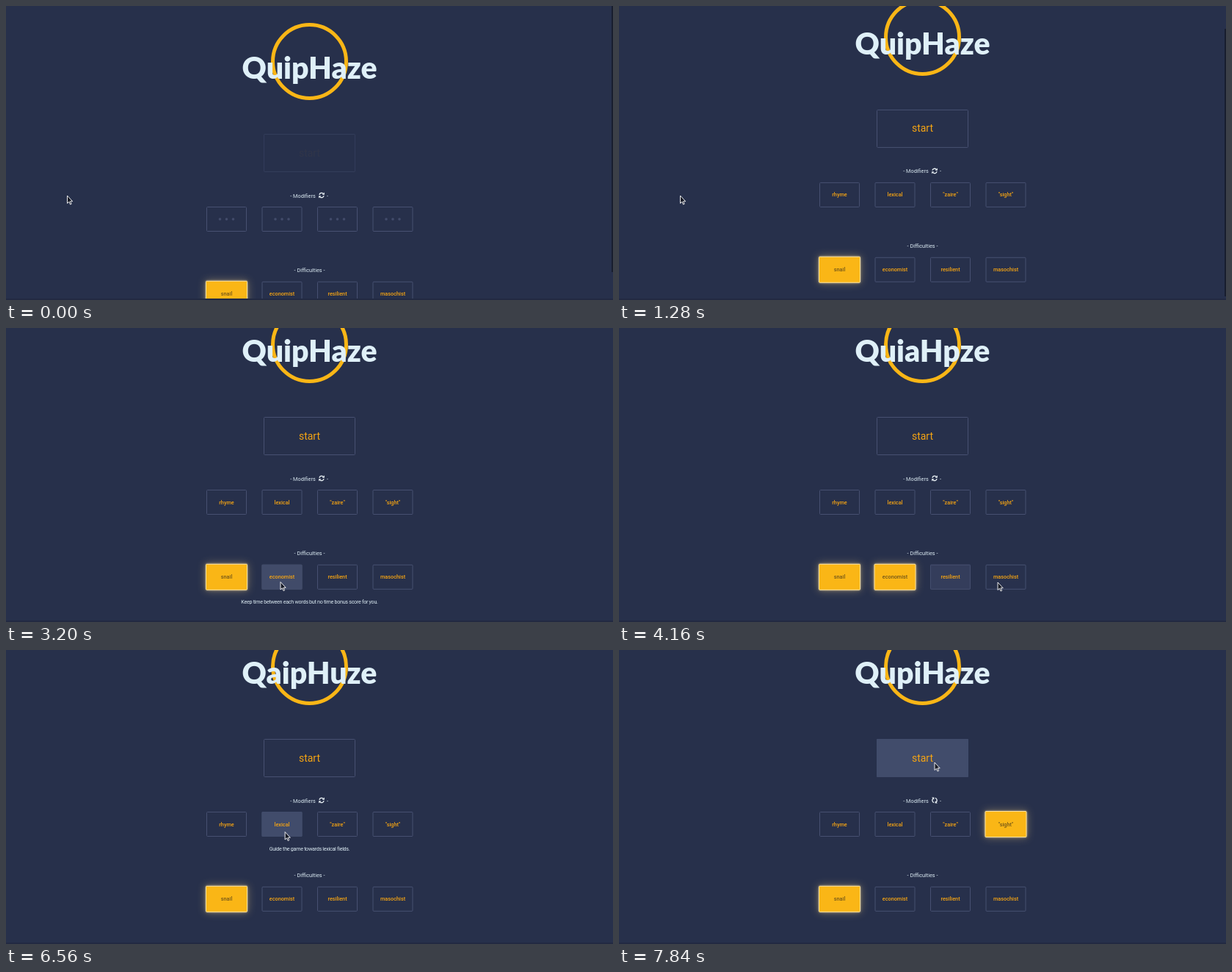
Write an HTML page that moves like this. It is 827 by 400 pixels and loops after 8 s.

```html
<!DOCTYPE html>
<html lang="en">
<head>
<meta charset="utf-8">
<title>QuipHaze</title>
<style>
html, body { margin: 0; width: 827px; height: 400px; overflow: hidden; background: #27304b; }
svg { display: block; }
text { font: 7.3px Roboto, sans-serif; text-anchor: middle; fill: #dcebf3; }
.name { font: 900 41px Lato, sans-serif; fill: #dff0f8; }
.label { font-weight: 500; fill: #f5a413; }
.big { font-size: 14px; font-weight: 400; }
.tip { font-size: 7.2px; letter-spacing: -.3px; }
.frame { fill: none; stroke: #475071; }
.hover { fill: #414c6b; }
.lit { fill: #fab616; stroke: #fde3a0; filter: drop-shadow(0 0 1.5px #fde3a099) drop-shadow(0 0 6px #e8c88066); }
.dots { fill: #434c6b; }
</style>
</head>
<body>
<svg width="827" height="400" viewBox="0 0 827 400">
  <g id="page">
    <circle cx="413.5" cy="75.5" r="50" fill="none" stroke="#fab616" stroke-width="5"/>
    <text id="name" class="name" x="413.5" y="99"></text>
    <text x="404.5" y="260.5">- Modifiers</text>
    <text x="438" y="260.5">-</text>
    <g id="icon" fill="#eef5f9">
      <g id="arrow">
        <path d="M-3.1 -.7A3.1 3.1 0 0 1 2.2 -2.2" fill="none" stroke="#eef5f9" stroke-width="1.3"/>
        <path d="M3.9 -3.9V-.7H.7Z"/>
      </g>
      <use href="#arrow" transform="rotate(180)"/>
    </g>
    <text x="413.5" y="362">- Difficulties -</text>
  </g>
  <rect y="398" width="827" height="2" fill="#222a42"/>
  <rect id="bar" x="825" width="2" fill="#181e2f"/>
  <path id="cursor" d="M0 0V10.5L2.4 8.3 4 12 5.6 11.3 4 7.8H7.2Z" fill="#161a26" stroke="#fff" stroke-width=".9"/>
</svg>
<script>
const LOOP = 8000, END = 9000;
const $ = id => document.getElementById(id);
const clamp = v => Math.max(0, Math.min(1, v));
const ramp = (t, start, length) => clamp((t - start) / length);

// Strength of a state that fades in and out over the given spans
const fade = (t, spans, length = 200) => Math.max(0, ...spans.map(
  ([on, off]) => Math.min(ramp(t, on, length), 1 - ramp(t, off, length))));

// Linear value of one column in a list of timed points
function along(points, t, col = 1) {
  const i = points.findIndex(p => p[0] > t);
  if (i < 0) return points[points.length - 1][col];
  if (!i) return points[0][col];
  const a = points[i - 1], b = points[i];
  return a[col] + (b[col] - a[col]) * (t - a[0]) / (b[0] - a[0]);
}

function add(tag, attrs, parent = $('page'), content = '') {
  const el = document.createElementNS('http://www.w3.org/2000/svg', tag);
  for (const key in attrs) el.setAttribute(key, attrs[key]);
  el.textContent = content;
  return parent.appendChild(el);
}

function makeButton(label, x, y, { w = 54, h = 33, big = false, hover = [], lit = [] } = {}) {
  const g = add('g', {}), mid = x + w / 2;
  const box = (cls, grow = 0) => add('rect', {
    class: cls, x: x - grow, y: y - grow, width: w + 2 * grow, height: h + 2 * grow, rx: 1 }, g);
  const button = { hover, lit, frame: box('frame'), hoverBox: box('hover', .5), litBox: box('lit', 1) };
  button.text = add('text', { class: 'label' + (big ? ' big' : ''), x: mid, y: y + h / 2 + (big ? 4.5 : 2.5) }, g, label);
  return button;
}

const column = i => 273.5 + i * 75.5;
const start = makeButton('start', 351.5, 174.5, { w: 124, h: 51, big: true, hover: [[7620, END]] });
const modifiers = [
  ['rhyme'],
  ['lexical', { hover: [[5880, 6720]] }],
  ['"zaire"', { hover: [[6820, 6900]] }],
  ['"sight"', { hover: [[6960, 7480]], lit: [[7020, END]] }]
].map(([label, opts], i) => makeButton(label, column(i), 273.5, opts));
const difficulties = [
  ['snail', { lit: [[-1000, END]] }],
  ['economist', { hover: [[2860, 3620], [4960, 5790]], lit: [[3200, 5560]] }],
  ['resilient', { hover: [[3720, 4060], [4680, 4900]] }],
  ['masochist', { hover: [[4150, 4640]] }]
].map(([label, opts], i) => makeButton(label, column(i), 375.3, opts));
const buttons = [start, ...modifiers, ...difficulties];

const dots = modifiers.map((_, i) => {
  const g = add('g', { class: 'dots' });
  for (const dx of [-9, 0, 9]) add('circle', { cx: column(i) + 27 + dx, cy: 290, r: 1.8 }, g);
  return g;
});

const tips = [
  ['Guide the game towards lexical fields.', 326, [[5900, 6720]]],
  ['Keep time between each words but no time bonus score for you.', 427.5, [[2900, 3620], [4960, 5740]]]
].map(([label, y, spans]) => ({ spans, el: add('text', { class: 'tip', x: 413.5, y }, $('page'), label) }));

const scrollPath = [[700, 0], [1280, 33], [1600, 53]];
const cursorPath = [
  [2240, 83.5, 258], [2400, 175.5, 279], [2880, 370, 345], [3520, 378, 346],
  [3840, 440, 345], [4000, 470, 345], [4160, 516, 346], [4480, 528, 345],
  [4800, 450, 348], [5120, 388, 349], [5600, 386, 347], [5760, 386, 340],
  [5920, 380, 247.5], [6560, 380, 247.5], [6720, 402, 245], [7040, 525, 240],
  [7440, 525, 240], [7600, 432, 203], [7760, 430, 155], [7840, 430, 153]
];

const NAME = 'QuipHaze';
const swaps = [[1, 5], [3, 5], [5, 6], [1, 5], [2, 3]];

// Two letters trade places for a while, then return
function scrambled(t) {
  const since = t - 2380;
  if (since < 0 || since % 1280 >= 800) return NAME;
  const [a, b] = swaps[Math.floor(since / 1280)], letters = [...NAME];
  [letters[a], letters[b]] = [letters[b], letters[a]];
  return letters.join('');
}

function draw(t) {
  const scroll = along(scrollPath, t), shown = ramp(t, 80, 400);
  $('page').setAttribute('transform', `translate(0 ${-scroll})`);
  $('name').textContent = scrambled(t);
  $('icon').setAttribute('transform', `translate(430 257.5) rotate(${90 * ramp(t, 7520, 240)})`);

  const top = scroll * .94;
  $('bar').setAttribute('y', top);
  $('bar').setAttribute('height', Math.min(400, 362 + scroll) - top);
  $('bar').style.opacity = t < 1900 ? 1 : 0;

  for (const b of buttons) {
    const lit = fade(t, b.lit);
    b.litBox.style.opacity = lit;
    b.hoverBox.style.opacity = fade(t, b.hover) * (1 - lit);
    b.text.style.fill = lit > .5 ? '#735719' : '';
  }
  start.frame.style.opacity = .4 + .6 * shown;
  start.text.style.opacity = .04 + .96 * shown;
  modifiers.forEach((b, i) => {
    b.text.style.opacity = shown;
    dots[i].style.opacity = 1 - shown;
  });
  for (const tip of tips) tip.el.style.opacity = fade(t, tip.spans, 150);

  $('cursor').setAttribute('transform', `translate(${along(cursorPath, t)} ${along(cursorPath, t, 2)})`);
}

const began = performance.now();
function tick() {
  draw((performance.now() - began) % LOOP);
  requestAnimationFrame(tick);
}
tick();
</script>
</body>
</html>
```
